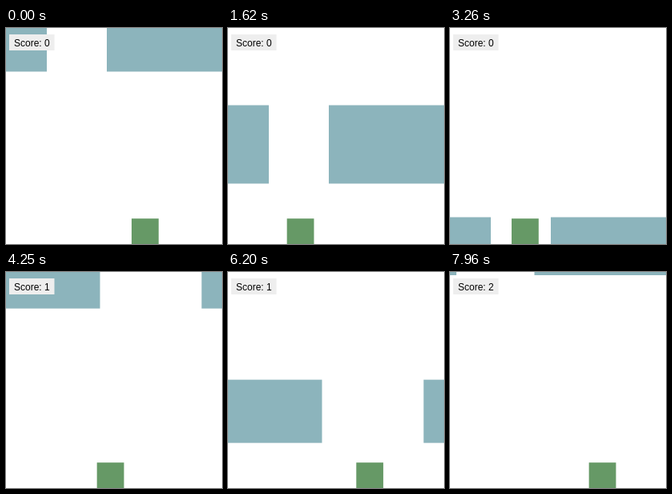
Animation, 270 px wide and 270 px high, one loop 7990 ms. Source, as an HTML page with a canvas:

```html
<!DOCTYPE html>
<html lang="en">
<head>
<meta charset="utf-8">
<title>Gap dodger</title>
<style>
  html, body { margin: 0; height: 100%; overflow: hidden; background: #fff; }
  canvas { display: block; width: 100vw; height: 100vh; }
</style>
</head>
<body>
<canvas id="stage"></canvas>
<script>
const SIZE = 270;
const LOOP = 7990;
const TICK = 55;
const FALL = 14 / 3;   // wall pixels per tick
const STRIDE = 10 / 3; // player pixels per tick
const RESYNC = 3663;   // first respawn shifts the tick phase

// Each wall: top edge at a reference tick, height, and gap.
const walls = [
  { tick: 0, top: -43.5, height: 98, left: 51, right: 126 },
  { tick: 90, top: 27.3, height: 79, left: 117.5, right: 244.5 },
  { tick: 145, top: -86, height: 90, left: 8, right: 105.5 }
];

// Player runs: starting tick, number of strides, direction.
const runs = [
  [0, 25, -1],
  [51, 1, 1],
  [66, 28, 1],
  [103, 3, -1],
  [129, 4, 1]
];

const canvas = document.getElementById("stage");
const ctx = canvas.getContext("2d");
const ratio = window.devicePixelRatio || 1;
canvas.width = canvas.height = Math.round(SIZE * ratio);
ctx.scale(canvas.width / SIZE, canvas.height / SIZE);

function tickAt(time) {
  return time < RESYNC
    ? Math.floor((time + 42) / TICK)
    : 90 + Math.floor((time - 4928) / TICK);
}

function scoreAt(time, tick) {
  if (time < RESYNC) return 0;
  return tick < 143 ? 1 : 2;
}

function playerX(tick) {
  return runs.reduce((x, [start, count, dir]) => {
    const strides = Math.max(0, Math.min(count, tick - start));
    return x + dir * strides * STRIDE;
  }, 157);
}

function box(color, x, y, w, h) {
  ctx.fillStyle = color;
  ctx.fillRect(x, y, w, h);
}

function drawWall(wall, tick) {
  const top = wall.top + (tick - wall.tick) * FALL;
  box("#8cb4bc", 0, top, wall.left, wall.height);
  box("#8cb4bc", wall.right, top, SIZE - wall.right, wall.height);
}

function drawScore(score) {
  box("#eee", 4, 8, 56.5, 20);
  ctx.fillStyle = "#000";
  ctx.font = "12px 'Liberation Sans', Arial, sans-serif";
  ctx.fillText("Score: " + score, 10, 23);
}

function draw(time) {
  const tick = tickAt(time);
  const score = scoreAt(time, tick);
  box("#fff", 0, 0, SIZE, SIZE);
  drawWall(walls[score], tick);
  box("#669966", playerX(tick), 238.2, 33.8, 31.8);
  drawScore(score);
}

const start = performance.now();
function frame() {
  draw((performance.now() - start) % LOOP);
  requestAnimationFrame(frame);
}
frame();
</script>
</body>
</html>
```
